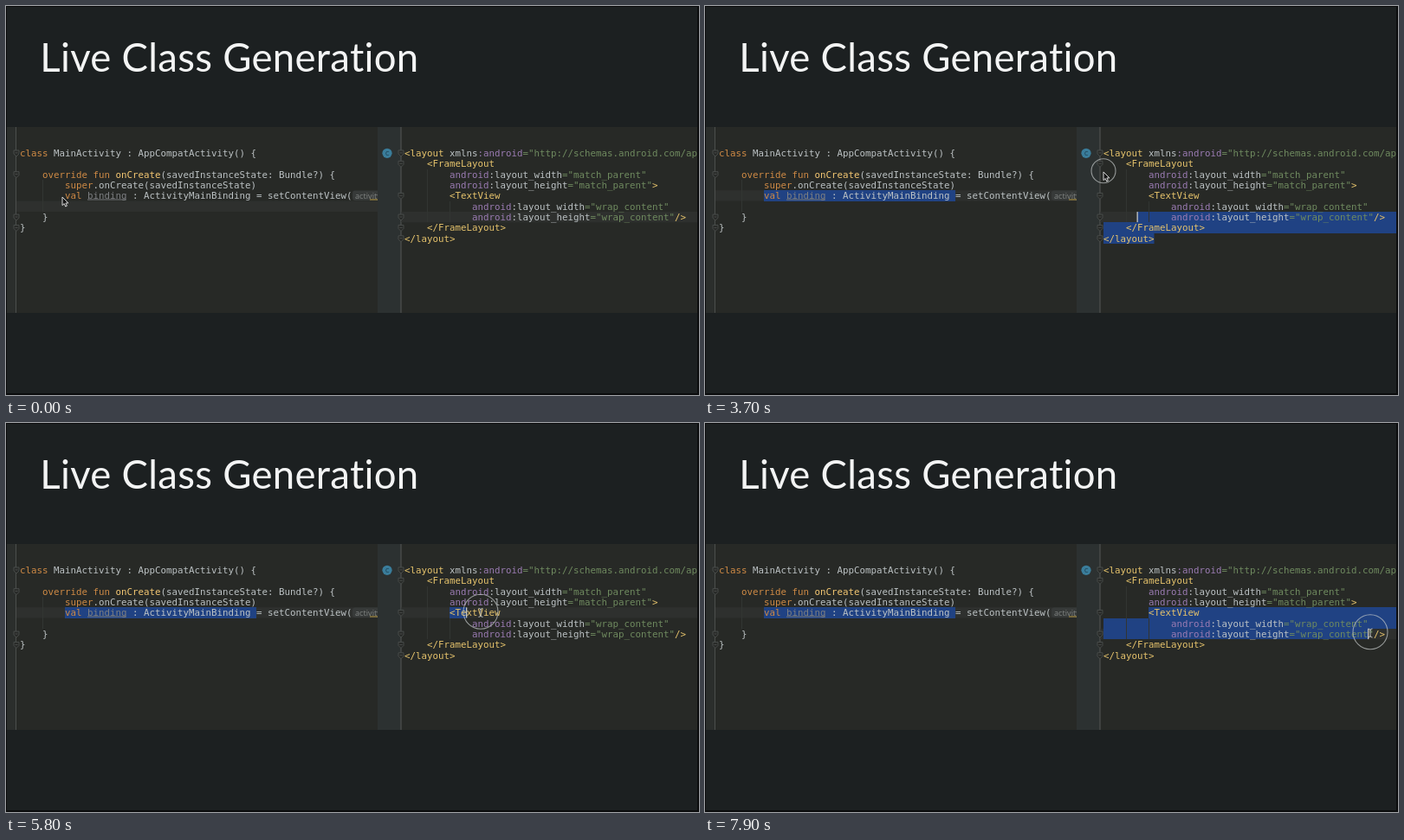
These frames come from a looping animation (800 by 450 pixels, 8 s). An HTML page with a canvas:

```html
<!DOCTYPE html>
<html lang="en">
<head>
<meta charset="utf-8">
<title>Live Class Generation</title>
<style>
html, body { margin: 0; width: 100%; height: 100%; overflow: hidden; background: #1c2021; }
canvas { display: block; width: 800px; height: 450px; }
</style>
</head>
<body>
<canvas id="stage" width="800" height="450"></canvas>
<script>
const ctx = document.getElementById('stage').getContext('2d');
const LOOP = 8000, CW = 6.5, LH = 12.35, TOP = 170, LAG = 90;
const C = {
  text: '#bcc2c4', key: '#cf8a45', fn: '#f5c873', tag: '#e6c36c', ns: '#9a7bb2',
  str: '#6f8a5f', dim: '#7d7f82', sel: '#204283', row: '#2e302e', guide: '#323532'
};

// Lines are lists of [text, colour] runs preceded by their indent.
const attr = (name, value, end = '') => [
  ['android', C.ns], [':' + name, C.text], ['="' + value + '"', C.str], [end, C.tag]
];
const left = {
  x: 16, x0: 12, x1: 429, folds: [0, 2, 6, 7], foldX: 12,
  lines: [
    [0, [['class', C.key], [' MainActivity : AppCompatActivity() {', C.text]]],
    [0, []],
    [4, [['override fun ', C.key], ['onCreate', C.fn], ['(savedInstanceState: Bundle?) {', C.text]]],
    [8, [['super', C.key], ['.onCreate(savedInstanceState)', C.text]]],
    [8, [['val ', C.key], ['binding', C.dim], [' : ActivityMainBinding = setContentView(', C.text]]],
    [0, []],
    [4, [['}', C.text]]],
    [0, [['}', C.text]]]
  ]
};
const right = {
  x: 460, x0: 456.5, x1: 798, folds: [0, 1, 4, 6, 7, 8], foldX: 456,
  lines: [
    [0, [['<layout ', C.tag], ['xmlns', C.text], [':android', C.ns],
      ['="http://schemas.android.com/apk/res/android"', C.str]]],
    [4, [['<FrameLayout', C.tag]]],
    [8, attr('layout_width', 'match_parent')],
    [8, attr('layout_height', 'match_parent', '>')],
    [8, [['<TextView', C.tag]]],
    [12, attr('layout_width', 'wrap_content')],
    [12, attr('layout_height', 'wrap_content', '/>')],
    [4, [['</FrameLayout>', C.tag]]],
    [0, [['</layout>', C.tag]]]
  ]
};
for (const pane of [left, right])
  pane.ends = pane.lines.map(([indent, runs]) => runs.reduce((n, r) => n + r[0].length, indent));

// Pointer path: time, x, y
const path = [
  [0, 65, 221], [500, 70, 220], [800, 69, 219], [1300, 175, 230], [1600, 232, 229],
  [1950, 283, 221], [2150, 288, 219], [2400, 287, 216], [2700, 290, 218], [3050, 430, 250],
  [3300, 530, 280], [3420, 528, 276], [3610, 499, 244], [3700, 460, 192], [4000, 462, 172],
  [4350, 470, 176], [4680, 514, 218], [4900, 519, 216], [5250, 516, 219], [5600, 513, 219],
  [6100, 600, 220], [6600, 660, 222], [7000, 710, 246], [7400, 757, 243], [7900, 768, 243], [8000, 768, 243]
];
const drags = [
  { pane: left, from: 800, to: 2150, keep: LOOP, row: 4, col: 8, ring: 14 },
  { pane: right, from: 3400, to: 4250, keep: 4680, row: 8, col: 9, ring: 14 },
  { pane: right, from: 5600, to: LOOP, keep: LOOP, row: 4, col: 8, ring: 20 }
];

const rowY = r => TOP + r * LH;
const colX = (pane, c) => pane.x + c * CW;
const clamp = (v, a, b) => Math.max(a, Math.min(b, v));

function pointer(t) {
  let i = 1;
  while (i < path.length - 1 && path[i][0] < t) i++;
  const [ta, xa, ya] = path[i - 1], [tb, xb, yb] = path[i];
  const k = clamp((t - ta) / (tb - ta), 0, 1);
  return { x: xa + (xb - xa) * k, y: ya + (yb - ya) * k };
}

function spot(pane, p) {
  const row = clamp(Math.round((p.y - TOP) / LH), 0, pane.lines.length - 1);
  return { row, col: clamp(Math.round((p.x - pane.x) / CW), 0, pane.ends[row]) };
}

function dragState(t, pane) {
  const d = drags.find(d => d.pane === pane && t >= d.from && t < d.keep);
  if (!d) return null;
  const head = spot(pane, pointer(clamp(t - LAG, d.from, d.to)));
  return { head, anchor: { row: d.row, col: d.col }, live: t < d.to };
}

function rect(x, y, w, h, color) {
  ctx.fillStyle = color;
  ctx.fillRect(x, y, w, h);
}

function text(s, x, y, color, font) {
  ctx.font = font;
  ctx.fillStyle = color;
  ctx.fillText(s, x, y);
}

const mono = '10.8px "DejaVu Sans Mono", monospace';

function selection(pane, { head, anchor }) {
  const flip = head.row < anchor.row || (head.row === anchor.row && head.col < anchor.col);
  const [a, b] = flip ? [head, anchor] : [anchor, head];
  for (let r = a.row; r <= b.row; r++) {
    const x = colX(pane, r === a.row ? a.col : 0);
    const end = r === b.row ? colX(pane, b.col) : pane.x1;
    const y = Math.round(rowY(r) - 6.2);
    rect(x, y, end - x, Math.round(rowY(r + 1) - 6.2) - y, C.sel);
  }
}

function foldMark(x, y) {
  ctx.beginPath();
  ctx.moveTo(x - 3, y - 3);
  ctx.lineTo(x + 3, y - 3);
  ctx.lineTo(x + 3, y + 1);
  ctx.lineTo(x, y + 4);
  ctx.lineTo(x - 3, y + 1);
  ctx.closePath();
  ctx.fillStyle = '#282a28';
  ctx.fill();
  ctx.strokeStyle = '#505351';
  ctx.lineWidth = 0.8;
  ctx.stroke();
  rect(x - 1.5, y - 0.5, 3, 0.8, '#505351');
}

function drawPane(pane, caretRow, state, matched) {
  ctx.save();
  ctx.beginPath();
  ctx.rect(1, 140, pane.x1 - 1, 215);
  ctx.clip();
  rect(pane.x0, rowY(caretRow) - 6.2, pane.x1 - pane.x0, LH, C.row);
  if (state) selection(pane, state);
  if (pane === left) rect(42, 201, 1, 37, C.guide);
  else {
    rect(486, 189, 1, 61, C.guide);
    rect(512, 226, 1, 24, C.guide);
  }
  if (matched) {
    rect(colX(pane, 8), rowY(4) - 6, CW, 12, '#41534a');
    rect(colX(pane, 48), rowY(6) - 6, CW * 2, 12, '#41534a');
    rect(449, 213, 1, 37, '#626764');
  }
  pane.lines.forEach(([indent, runs], r) => {
    let col = indent;
    for (const [s, color] of runs) {
      const bold = matched && s === '/>';
      text(s, colX(pane, col), rowY(r) + 4, color, (bold ? 'bold ' : '') + mono);
      col += s.length;
    }
  });
  if (pane === left) {
    rect(94, 223.5, 45, 1, '#77797b');
    ctx.beginPath();
    ctx.roundRect(400, 213.5, 40, 11.5, 3);
    ctx.fillStyle = '#373a39';
    ctx.fill();
    text('activity', 403, 222.5, '#808482', '9.2px "Open Sans", sans-serif');
    rect(420, 223.5, 9, 1, '#b5963f');
  }
  if (state && state.live)
    rect(colX(pane, state.head.col) - 0.5, rowY(state.head.row) - 6, 1.3, 12, '#c4c6c4');
  ctx.restore();
  for (const r of pane.folds) foldMark(pane.foldX, rowY(r));
}

function arrow(x, y) {
  const shape = [[0, 0], [0, 9.6], [2.2, 7.6], [3.7, 11], [5.4, 10.2], [3.9, 7], [6.9, 7]];
  ctx.beginPath();
  for (const [dx, dy] of shape) ctx.lineTo(x + dx, y + dy);
  ctx.closePath();
  ctx.fillStyle = '#151515';
  ctx.fill();
  ctx.strokeStyle = '#d8d8d8';
  ctx.lineWidth = 1;
  ctx.stroke();
}

function beam(x, y) {
  ctx.beginPath();
  ctx.moveTo(x - 2.5, y - 5);
  ctx.quadraticCurveTo(x, y - 5, x, y - 3);
  ctx.lineTo(x, y + 3);
  ctx.quadraticCurveTo(x, y + 5, x - 2.5, y + 5);
  ctx.moveTo(x + 2.5, y - 5);
  ctx.quadraticCurveTo(x, y - 5, x, y - 3);
  ctx.moveTo(x, y + 3);
  ctx.quadraticCurveTo(x, y + 5, x + 2.5, y + 5);
  ctx.strokeStyle = '#bcbfbd';
  ctx.lineWidth = 1;
  ctx.stroke();
}

function ring(x, y, r) {
  ctx.beginPath();
  ctx.arc(x, y, r, 0, Math.PI * 2);
  ctx.strokeStyle = 'rgba(195,200,200,0.7)';
  ctx.lineWidth = 1.1;
  ctx.stroke();
}

function backdrop() {
  rect(0, 0, 800, 450, '#0b0c0d');
  rect(1, 1, 797, 447, '#1c2021');
  rect(1, 140, 797, 215, '#272926');
  rect(1, 140, 10, 215, '#2b2e2c');
  rect(429, 140, 27, 215, '#2c3131');
  rect(11, 140, 1, 215, '#4c4f4d');
  rect(455.5, 140, 1, 215, '#565957');
  ctx.letterSpacing = '0.3px';
  text('Live Class Generation', 39.3, 75.5, '#f3f4f4', '45.5px Lato, sans-serif');
  ctx.letterSpacing = '0px';
  ctx.beginPath();
  ctx.arc(440, 170.3, 5.6, 0, Math.PI * 2);
  ctx.fillStyle = '#3a7d9b';
  ctx.fill();
  text('c', 437.4, 172.8, '#1f4254', '8.5px "DejaVu Sans Mono", monospace');
}

function draw(t) {
  backdrop();
  const l = dragState(t, left), r = dragState(t, right);
  const clicked = t >= 4680 && t < 5600;
  drawPane(left, l ? l.head.row : 5, l);
  drawPane(right, r ? r.head.row : clicked ? 4 : 6, r, clicked);

  const p = pointer(t);
  const held = drags.find(d => t >= d.from && t < d.to);
  if (held) ring(p.x, p.y - 1.2, held.ring);
  if (t >= 5600) beam(p.x, p.y);
  else arrow(p.x, p.y);
}

function tick(now) {
  draw(now % LOOP);
  requestAnimationFrame(tick);
}
requestAnimationFrame(tick);
</script>
</body>
</html>
```
